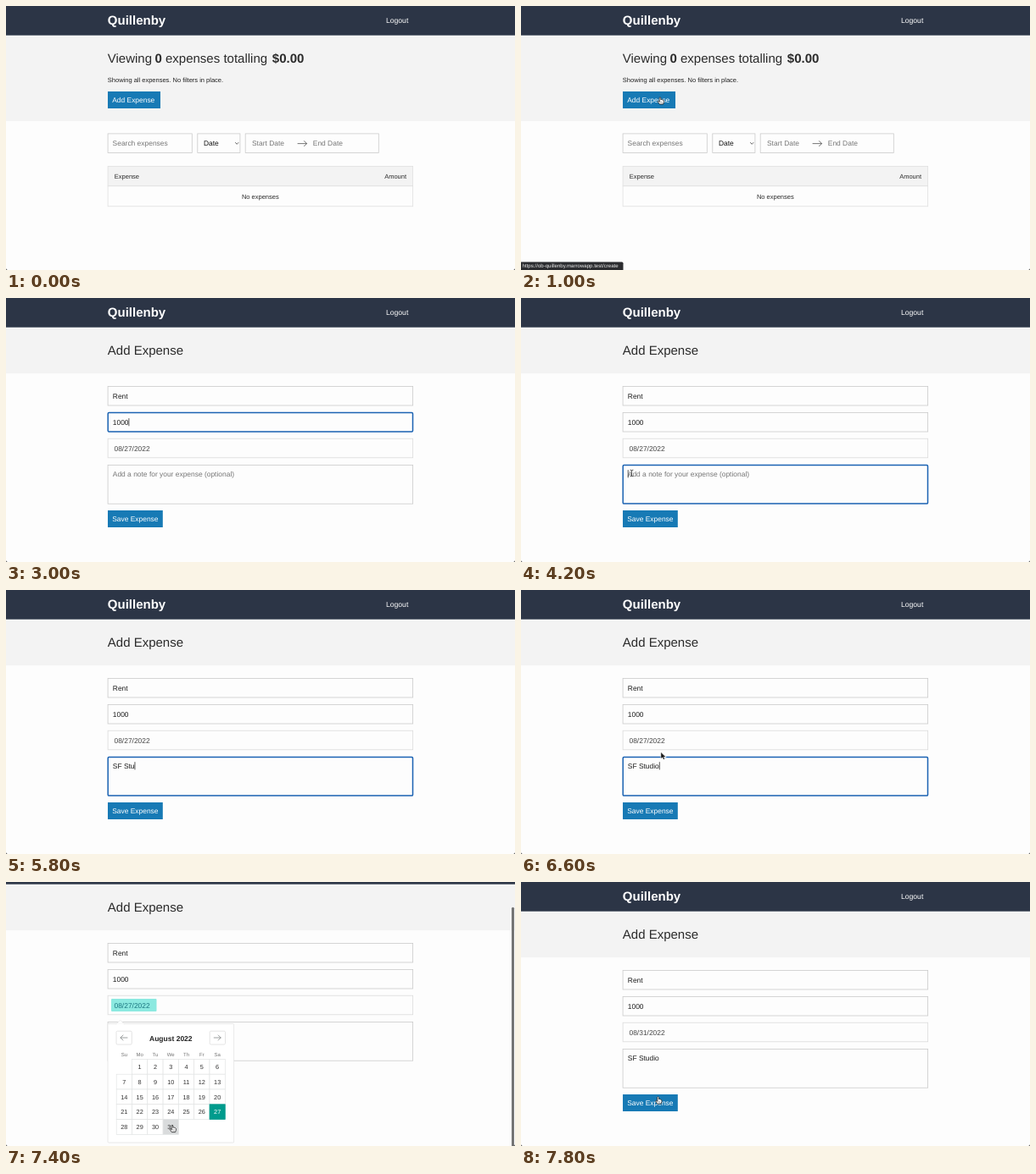
An HTML page that plays this animation: 600x312 px, repeating every 8 s.

```html
<!DOCTYPE html>
<html lang="en">
<head>
<meta charset="utf-8">
<title>Expense tracker</title>
<style>
  html, body { margin: 0; width: 100%; height: 100%; overflow: hidden; background: #fdfdfd; }
  svg { display: block; width: 100vw; height: 100vh; }
  text {
    font-family: "Liberation Sans", Arial, sans-serif;
    text-rendering: geometricPrecision;
    white-space: pre;
  }
</style>
</head>
<body>
<svg id="stage" viewBox="0 0 600 312"></svg>
<script>
const LOOP = 8000, STEP = 200;
const BODY = 7.5, FIELD = 8.44, HEADING = 15;
const INK = '#2b2b2b', HINT = '#767676', BLUE = '#177ab5', RING = '#1a62b2', LINE = '#cbcbcb';
const stage = document.getElementById('stage');

const rect = (x, y, w, h, fill, extra = '') =>
  `<rect x="${x}" y="${y}" width="${w}" height="${h}" fill="${fill}" ${extra}/>`;
const box = (x, y, w, h, line = LINE, fill = '#fdfdfd') =>
  rect(x + .4, y + .4, w - .8, h - .8, fill, `stroke="${line}" stroke-width=".8"`);
const text = (x, y, size, str, fill = INK, extra = '') =>
  `<text x="${x}" y="${y}" font-size="${size}" fill="${fill}" ${extra}>${str}</text>`;
const path = (d, stroke, width, fill = 'none') =>
  `<path d="${d}" stroke="${stroke}" stroke-width="${width}" fill="${fill}" stroke-linejoin="round" stroke-linecap="round"/>`;
const BOLD = 'font-weight="700"', MIDDLE = 'text-anchor="middle"', END = 'text-anchor="end"';

// Last entry whose step has been reached: [[step, value], ...]
const at = (track, step) => track.reduce((v, [s, value]) => s <= step ? value : v, null);

const nameTrack = [[0, ''], [8, 'R'], [9, 'Ren'], [10, 'Rent']];
const amountTrack = [[0, ''], [13, '1'], [14, '100'], [15, '1000']];
const noteTrack = [[0, ''], [24, 'S'], [25, 'SF'], [26, 'SF '], [27, 'SF S'], [29, 'SF Stu'], [30, 'SF Studio']];
const focusTrack = [[0, ''], [6, 'name'], [11, 'amount'], [21, 'note'], [34, 'date'], [38, '']];
const scrollTrack = [[0, 0], [35, 10], [36, 32], [38, 0]];
const hoverTrack = [[0, 0], [35, 18], [36, 31]];
const pointerTrack = [
  [0, null],
  [1, ['arrow', 286, 150]], [2, ['arrow', 238, 122]], [3, ['arrow', 200, 110]],
  [4, ['hand', 167, 108]], [5, ['hand', 164, 107.5]], [7, null],
  [10, ['arrow', 157.5, 131]], [11, ['beam', 155, 146]], [13, null],
  [17, ['beam', 153, 148]], [18, ['arrow', 145, 162]], [19, ['arrow', 137, 190]],
  [20, ['beam', 132, 204]], [21, ['beam', 130.5, 207]], [23, null],
  [32, ['beam', 160, 222]], [33, ['arrow', 165, 192]], [34, ['beam', 167, 178]],
  [35, ['hand', 203.5, 283]], [36, ['hand', 198, 287]], [37, ['hand', 196, 287]],
  [38, ['arrow', 183, 275]], [39, ['hand', 161.5, 253.5]]
];

const pointers = {
  arrow: path('M0 0V7.6L1.8 6L3 8.7L4.3 8.1L3.1 5.5H5.5Z', '#fff', .9, '#fff') +
         path('M.3 .8V6.6L1.9 5.2L3.2 8L3.8 7.7L2.5 4.9H4.5Z', '#111', .5, '#111'),
  hand: path('M-.8 .8Q0 -.4 .8 .8V3.2L1.9 3L2.8 3.4L3.7 3.7L4.4 4.4V6.2L3.6 8.6H-.7L-2.6 5.7Q-2.9 4.6 -1.8 4.8L-.8 5.6Z',
             '#222', .8, '#fff') +
        path('M.9 5.4V7.2M2.2 5.4V7.2', '#555', .4),
  beam: path('M-1.5 -3.8Q0 -3.8 0 -2.8Q0 -3.8 1.5 -3.8M0 -2.8V2.8M-1.5 3.8Q0 3.8 0 2.8Q0 3.8 1.5 3.8', '#333', .8)
};

const topBar = () =>
  rect(0, 0, 600, 34.7, '#2c3546') +
  text(119.8, 22.4, HEADING, 'Quillenby', '#fff', BOLD) +
  text(448, 20, 8.6, 'Logout', '#fff');

const button = (y, w, label) =>
  rect(120, y, w, 20, BLUE) + text(125.2, y + 13, FIELD, label, '#fff');

const arrowLine = (x, y, w, dir, color) => {
  const tip = dir > 0 ? x + w : x, back = tip - dir * 3;
  return path(`M${x} ${y}H${x + w}M${back} ${y - 3}L${tip} ${y}L${back} ${y + 3}`, color, .8);
};

function listPage() {
  return rect(0, 34.7, 600, 101.3, '#f3f3f3') + topBar() +
    text(119.8, 67, HEADING, 'Viewing') +
    text(175.5, 67, HEADING, '0', INK, BOLD) +
    text(188, 67, HEADING, 'expenses totalling') +
    text(313.8, 67, HEADING, '$0.00', INK, BOLD) +
    text(119.8, 90.2, BODY, 'Showing all expenses. No filters in place.', '#222') +
    button(101, 62, 'Add Expense') +
    box(119.7, 150.5, 100, 23.5) + text(125.6, 165.4, FIELD, 'Search expenses', HINT) +
    box(225.4, 150.5, 50.9, 23.5) + text(233, 165.4, FIELD, 'Date', '#111') +
    path('M270.5 161.5L272.2 163.3L273.9 161.5', '#444', .8) +
    box(281.8, 150.5, 157.9, 23.5) +
    text(290, 165.4, FIELD, 'Start Date', HINT) +
    arrowLine(344, 162.6, 10.5, 1, '#555') +
    text(361.8, 165.4, FIELD, 'End Date', HINT) +
    box(119.7, 189, 360.3, 24.2, '#e0e0e0', '#f3f3f3') +
    box(119.7, 212.4, 360.3, 24.8, '#e0e0e0') +
    text(127.8, 204.1, BODY, 'Expense') +
    text(472, 204.1, BODY, 'Amount', INK, END) +
    text(299.8, 227.7, BODY, 'No expenses', INK, MIDDLE);
}

function field(y, h, value, hint, focused) {
  const frame = focused
    ? rect(120.2, y + .5, 359.3, h - 1, '#fdfdfd', `rx="1.2" stroke="${RING}" stroke-width="1.5"`)
    : box(119.7, y, 360.3, h);
  const label = `<text x="125.8" y="${y + 14.6 - (h > 30 ? .5 : 0)}" font-size="${FIELD}" ` +
    `fill="${value ? '#1c1c1c' : HINT}">${value || hint}</text>`;
  return frame + label;
}

const em = { R: .722, e: .556, n: .556, t: .278, S: .667, F: .611, ' ': .278, u: .556, d: .556, i: .222, o: .556 };
function caret(y, value) {
  const w = [...value].reduce((sum, c) => sum + (em[c] || .556), 0) * FIELD;
  return rect(125.8 + w, y - 4.6, .7, 9.2, '#111');
}

function calendar(hover) {
  const left = 130.2, top = 241.4, w = 18.3, h = 17.8;
  let out = rect(120, 199.5, 148.6, 140.5, '#fff', 'stroke="#e3e3e3" stroke-width=".8" rx="1"') +
    path('M130 199.8L134.7 195.3L139.4 199.8', '#e3e3e3', .6, '#fff');
  for (const [x, dir] of [[130, -1], [240.2, 1]])
    out += rect(x, 208.2, 18.3, 15.8, '#fff', 'rx="1.4" stroke="#dedede" stroke-width=".8"') +
      arrowLine(x + 5, 216, 8, dir, '#858888');
  out += text(194.3, 219.6, 8.5, 'August 2022', '#222', BOLD + ' ' + MIDDLE);
  ['Su', 'Mo', 'Tu', 'We', 'Th', 'Fr', 'Sa'].forEach((day, i) => {
    out += text(left + (i + .5) * w, 238.2, 6, day, '#757575', MIDDLE);
  });
  for (let day = 1; day <= 31; day++) {
    const x = left + day % 7 * w, y = top + Math.floor(day / 7) * h;
    const picked = day === 27;
    const fill = picked ? '#009b8d' : day === hover ? '#d9dbdc' : '#fff';
    out += rect(x, y, w, h, fill, `stroke="${picked ? '#009b8d' : '#e2e4e4'}" stroke-width=".7"`) +
      text(x + w / 2, y + 11.6, 7.3, day, picked ? '#fff' : '#333', MIDDLE);
  }
  return out;
}

function formPage(step) {
  const focus = at(focusTrack, step);
  const values = { name: at(nameTrack, step), amount: at(amountTrack, step), note: at(noteTrack, step) };
  const caretY = { name: 115.6, amount: 146.7, note: 207.8 };
  const open = focus === 'date';
  return rect(0, 34.7, 600, 54.4, '#f3f3f3') + topBar() +
    text(119.8, 67, HEADING, 'Add Expense') +
    field(104, 23.4, values.name, 'Description', focus === 'name') +
    field(135, 23.4, values.amount, 'Amount', focus === 'amount') +
    box(119.7, 165.8, 360.3, 23.4, '#dcdcdc') +
    (open ? rect(124, 170, 53.5, 15, '#8ce9e0', 'rx="1"') : '') +
    text(127.5, 180.7, FIELD, step < 38 ? '08/27/2022' : '08/31/2022', open ? '#1b7580' : '#444') +
    field(197, 46.6, values.note, 'Add a note for your expense (optional)', focus === 'note') +
    (focus in caretY ? caret(caretY[focus], values[focus]) : '') +
    button(251, 64.8, 'Save Expense') +
    (open ? calendar(at(hoverTrack, step)) : '');
}

function linkStatus() {
  return path('M0 302.6H119Q120.5 302.6 120.5 304.2V312H0Z', 'none', 0, '#2b2c2f') +
    text(1.6, 309.4, 6.1, 'https://ob-quillenby.marrowapp.test/create', '#eee');
}

function draw(step) {
  const scroll = at(scrollTrack, step), pointer = at(pointerTrack, step);
  let out = rect(0, 0, 600, 312, '#fdfdfd') +
    `<g transform="translate(0 ${-scroll})">${step < 6 ? listPage() : formPage(step)}</g>`;
  if (scroll) out += rect(596, 1 + scroll * .9, 3, 283, '#747474', 'rx="1.5"');
  if (step >= 4 && step <= 6) out += linkStatus();
  if (pointer) {
    const [kind, x, y] = pointer;
    out += `<g transform="translate(${x} ${y})">${pointers[kind]}</g>`;
  }
  // rounded window corners
  out += path('M0 310Q0 312 2 312H0ZM600 310Q600 312 598 312H600Z', 'none', 0, '#222');
  stage.innerHTML = out;
}

let shown = -1;
const start = performance.now();
function tick() {
  const step = Math.floor((performance.now() - start) % LOOP / STEP);
  if (step !== shown) draw(shown = step);
  requestAnimationFrame(tick);
}
tick();
</script>
</body>
</html>
```
